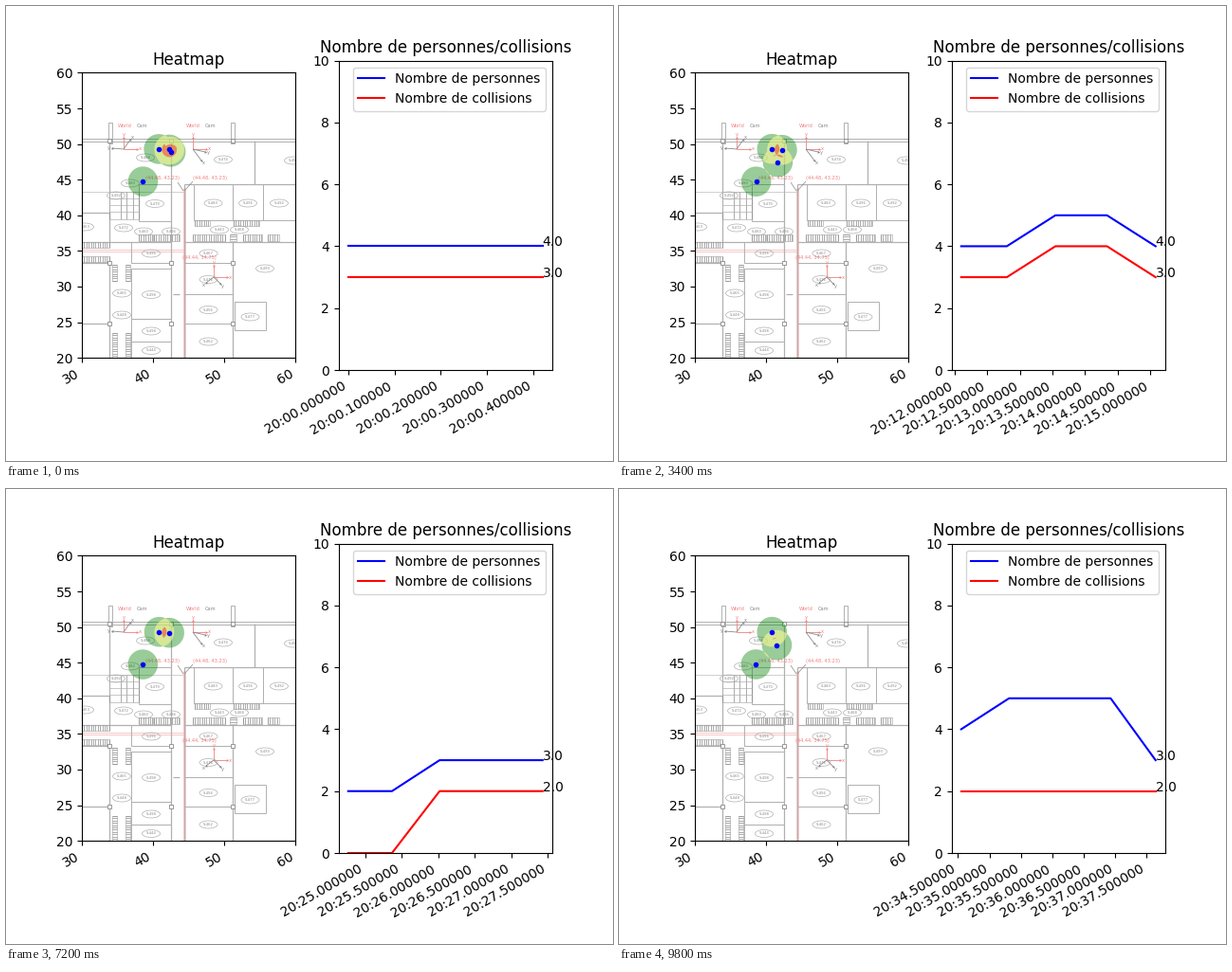
A matplotlib script that plays this animation: 640 by 480 pixels, repeating every 10 s.

```python
import numpy as np
import matplotlib.pyplot as plt
from matplotlib.animation import FuncAnimation
from matplotlib.collections import LineCollection
from matplotlib.patches import Ellipse, Rectangle
from matplotlib.transforms import Affine2D

W, H, FRAMES, STEP = 640, 480, 50, 200
WINDOW = 5            # samples kept in the chart
RADIUS = 2.1          # drawn zone around a person
CLOSE = 2.0           # distance that counts as a collision
GREY, DARK, RED, PINK = "#b0b0b0", "#888888", "#f08080", "#f3b0b0"

plt.rcParams["font.family"] = "DejaVu Sans"

# --- people -----------------------------------------------------------------
DESK, DOOR, SILL = (38.57, 44.76), (40.82, 49.33), (42.25, 49.2)

# First and last sample of every stay.
DOOR_STAYS = [(-1, 43), (46, 49)]
SILL_STAYS = [(-1, 5), (7, 24), (27, 27), (34, 39), (41, 48)]
TABLE_STAYS = [(2, 4), (7, 22), (42, 48)]
WALKER_STAYS = [(-1, 3), (6, 12), (15, 16), (20, 22), (38, 38), (42, 49)]

# Walker's turning points: sample, x, y.
WALK = np.array([(0, 42.45, 48.9), (2, 41.9, 50.77), (4, 37.8, 47.2),
                 (6, 37.8, 47.2), (8, 39.2, 48.4), (9, 37.8, 47.3),
                 (12, 37.8, 47.3), (15, 42.3, 48.5), (20, 42.0, 48.3),
                 (22, 37.7, 47.2), (38, 37.7, 47.2), (41, 40.6, 47.9),
                 (44, 39.65, 48.45), (46, 37.65, 47.2), (48, 37.65, 47.2),
                 (49, 41.5, 47.5)]).T


def table(i):
    return 41.64, 47.4 - 0.17 * np.cos(2 * np.pi * (i - 8) / 13.3)


def walker(i):
    return tuple(np.interp(i, WALK[0], axis) for axis in WALK[1:])


def places(i):
    spots = [(DOOR, DOOR_STAYS), (SILL, SILL_STAYS),
             (table(i), TABLE_STAYS), (walker(i), WALKER_STAYS)]
    here = [spot for spot, stays in spots if any(a <= i <= b for a, b in stays)]
    return np.array([DESK] + here)


def collisions(pts):
    gaps = np.linalg.norm(pts[:, None] - pts[None], axis=2)
    np.fill_diagonal(gaps, np.inf)
    return int((gaps.min(axis=1) < CLOSE).sum())


samples = np.arange(-1, FRAMES)
people = [len(places(i)) for i in samples]
hits = [collisions(places(i)) for i in samples]

# A sample takes longer the more people it holds; a few clock readings fix the pace.
load = np.cumsum(0.37 + 0.05 * (np.array(people) + np.array(people[:1] + people[:-1])))
clock = {-1: 0, 0: 0.42, 5: 5.45, 9: 9.05, 13: 12.1, 17: 15.08, 25: 20.34,
         29: 22.86, 32: 24.77, 36: 27.43, 40: 30.61, 44: 33.77, 45: 34.55, 49: 37.64}
seconds = np.interp(load, load[np.array(list(clock)) + 1], list(clock.values()))
days = (1200 + seconds) / 86400

# --- floor plan, in stage pixels with y downwards ------------------------------
fig, (heat, chart) = plt.subplots(1, 2, figsize=(W / 100, H / 100), dpi=100)
heat.set_title("Heatmap")
heat.set(xlim=(30, 60), ylim=(20, 60), xticks=range(30, 61, 10),
         yticks=range(20, 61, 5), aspect="equal")
heat.autoscale(False)
plan = Affine2D().scale(1 / W, -1 / H).translate(0, 1) + fig.transFigure
rng = np.random.default_rng(4)


def lines(segs, color=GREY, lw=0.7):
    pairs = [((a, b), (c, d)) for a, b, c, d in segs]
    heat.add_collection(LineCollection(pairs, colors=color, linewidths=lw,
                                       transform=plan, zorder=1), autolim=False)


def across(y, x0, x1, **style):
    lines([(x0, y, x1, y)], **style)


def down(x, y0, y1, **style):
    lines([(x, y0, x, y1)], **style)


def box(x0, y0, x1, y1, fill="none", color=GREY, lw=0.7):
    heat.add_artist(Rectangle((x0, y0), x1 - x0, y1 - y0, fc=fill, ec=color,
                              lw=lw, transform=plan, zorder=1))


def word(x, y, s, color=DARK, size=3.7):
    heat.text(x, y, s, color=color, fontsize=size, ha="center", va="center",
              transform=plan, zorder=1, clip_on=True)


def label(x, y):
    heat.add_artist(Ellipse((x, y), 19, 8, fc="none", ec=GREY, lw=0.5,
                            transform=plan, zorder=1))
    word(x, y, f"S-{rng.integers(440, 500)}", size=2.7)


def rooms(xs, ys):
    for x0, x1 in zip(xs, xs[1:]):
        for y0, y1 in zip(ys, ys[1:]):
            box(x0, y0, x1, y1)
            label((x0 + x1) / 2, (y0 + y1) / 2 + 1)


def shelf(x0, y0, x1, y1):
    box(x0, y0, x1, y1, lw=0.5)
    if x1 - x0 > y1 - y0:
        lines([(x, y0, x, y1) for x in np.arange(x0, x1, 2.4)], DARK, 0.5)
    else:
        lines([(x0, y, x1, y) for y in np.arange(y0, y1, 2.4)], DARK, 0.5)


def arrow(x, y, dx, dy, color, name):
    lines([(x, y, x + dx, y + dy)], color, 0.6)
    heat.plot([x + dx], [y + dy], marker=(3, 0, np.degrees(np.arctan2(-dx, -dy))),
              ms=2.4, mew=0, color=color, transform=plan, zorder=1)
    far = 1 + 3.5 / np.hypot(dx, dy)
    word(x + dx * far, y + dy * far, name, color)


def triad(x, y, gx, gy):
    arrow(x, y, 0, -12, RED, "y")
    arrow(x, y, 14, 0, RED, "x")
    arrow(x, y, *gx, DARK, "x")
    arrow(x, y, *gy, DARK, "y")


def draw_plan():
    for y in (140, 142.5):
        across(y, 80, 305)
    for x in (109.5, 239):
        box(x - 2, 123, x + 2, 145)
    for x, y0, y1 in ((109, 143, 196), (262, 142, 188), (174, 142, 371),
                      (188, 188, 271), (109, 218, 249), (109, 270, 371),
                      (239, 249, 371)):
        down(x, y0, y1, lw=0.9)
    for y, x0, x1 in ((188, 188, 305), (218, 80, 109), (248.5, 80, 174),
                      (248.5, 188, 305), (271, 80, 109), (335, 80, 109),
                      (304, 176, 183)):
        across(y, x0, x1, lw=0.9)

    across(195.5, 80, 187, color="#cfcfcf")
    for y in (257, 259):
        across(y, 80, 187, color=PINK, lw=0.5)
    for x in (186.5, 189):
        down(x, 192, 371, color=PINK, lw=0.5)
    lines([(181, 186, 187, 195), (197, 185, 188, 195)], DARK, 0.5)

    rooms((198, 239, 271, 305), (188, 226))
    rooms((140, 174), (188, 227))
    rooms((132, 174), (249, 271))
    rooms((132, 174), (277, 330, 354, 371))
    rooms((188, 239), (249, 271, 304, 335, 371))
    rooms((241, 274), (312, 342))
    for x in (109, 121, 127, 134, 140):
        down(x, 196, 225, color=DARK, lw=0.5)
    for y in (196, 203, 210, 217, 225):
        across(y, 109, 140, lw=0.5)
    for x, y in ((147, 160), (229, 162), (303, 163), (131, 187), (116, 200),
                 (83, 233), (124, 234), (145, 238), (174, 238), (225, 236),
                 (246, 236), (273, 277), (122, 303), (122, 326)):
        label(x, y)

    for x0, x1 in ((199, 215), (240, 267)):
        shelf(x0, 226, x1, 232)
    for x0, x1 in ((140, 155), (156, 183), (197, 231), (236, 243),
                   (250, 270), (276, 288)):
        shelf(x0, 241, x1, 248)
    for y in (249, 264):
        shelf(80, y, 109, y + 6)
    for x in (112, 126):
        for y0, y1 in ((273, 290), (345, 371)):
            shelf(x, y0, x + 5, y1)
    for x in (109, 174, 239):
        for y in (142, 271, 335):
            box(x - 2, y - 2, x + 2, y + 2, "white", DARK, 0.6)

    for x in (125, 197):
        word(x, 126, "World", RED)
        word(x + 18.5, 126, "Cam")
    for x, y, s in ((165, 182, "(44.48, 43.23)"), (215, 182, "(44.48, 43.23)"),
                    (204, 266, "(44.44, 34.75)")):
        word(x, y, s, RED)
    triad(124, 151, (7, -10), (-12, -1))
    triad(197, 151, (9, 12), (13, 3))
    triad(219, 286, (-8, 6), (7, 7))


draw_plan()
dots, = heat.plot([], [], "bo", ms=3, zorder=4)

# --- chart ------------------------------------------------------------------
chart.set_title("Nombre de personnes/collisions")
chart.xaxis_date()
series = [(people, chart.plot([], [], "b", label="Nombre de personnes")[0]),
          (hits, chart.plot([], [], "r", label="Nombre de collisions")[0])]
tags = [chart.text(0, 0, "") for _ in series]
chart.set_ylim(0, 10)
chart.legend(loc="upper right")
fig.autofmt_xdate()

# --- animation --------------------------------------------------------------
grid = np.meshgrid(np.arange(34, 48, 0.05), np.arange(40, 56, 0.05))
# How many others overlap, radius, colour, alpha.
LAYERS = [(0, RADIUS, "green", 0.4), (1, RADIUS, (1, 0.98, 0.58), 0.6),
          (1, RADIUS / 2, "red", 0.4)]
zones = []


def update(i):
    while zones:
        zones.pop().remove()
    pts = places(i)
    pts = pts + np.random.default_rng(i).uniform(-0.03, 0.03, pts.shape)
    dots.set_data(*pts.T)
    near = np.sort([np.hypot(grid[0] - x, grid[1] - y) for x, y in pts], axis=0)
    for z, (rank, r, color, alpha) in enumerate(LAYERS):
        zones.append(heat.contourf(*grid, near[rank], levels=[-1, r],
                                   colors=[color], alpha=alpha,
                                   antialiased=True, zorder=1.5 + z / 10))

    last = i + 1
    first = max(0, last + 1 - WINDOW)
    for (values, line), tag in zip(series, tags):
        line.set_data(days[first:last + 1], values[first:last + 1])
        tag.set_position((days[last], values[last]))
        tag.set_text(f"{values[last]:.1f}")
    pad = 0.05 * (days[last] - days[first])
    chart.set_xlim(days[first] - pad, days[last] + pad)
    return []


anim = FuncAnimation(fig, update, frames=FRAMES, interval=STEP,
                     init_func=lambda: update(0), repeat=True, repeat_delay=0)
plt.show()
```
